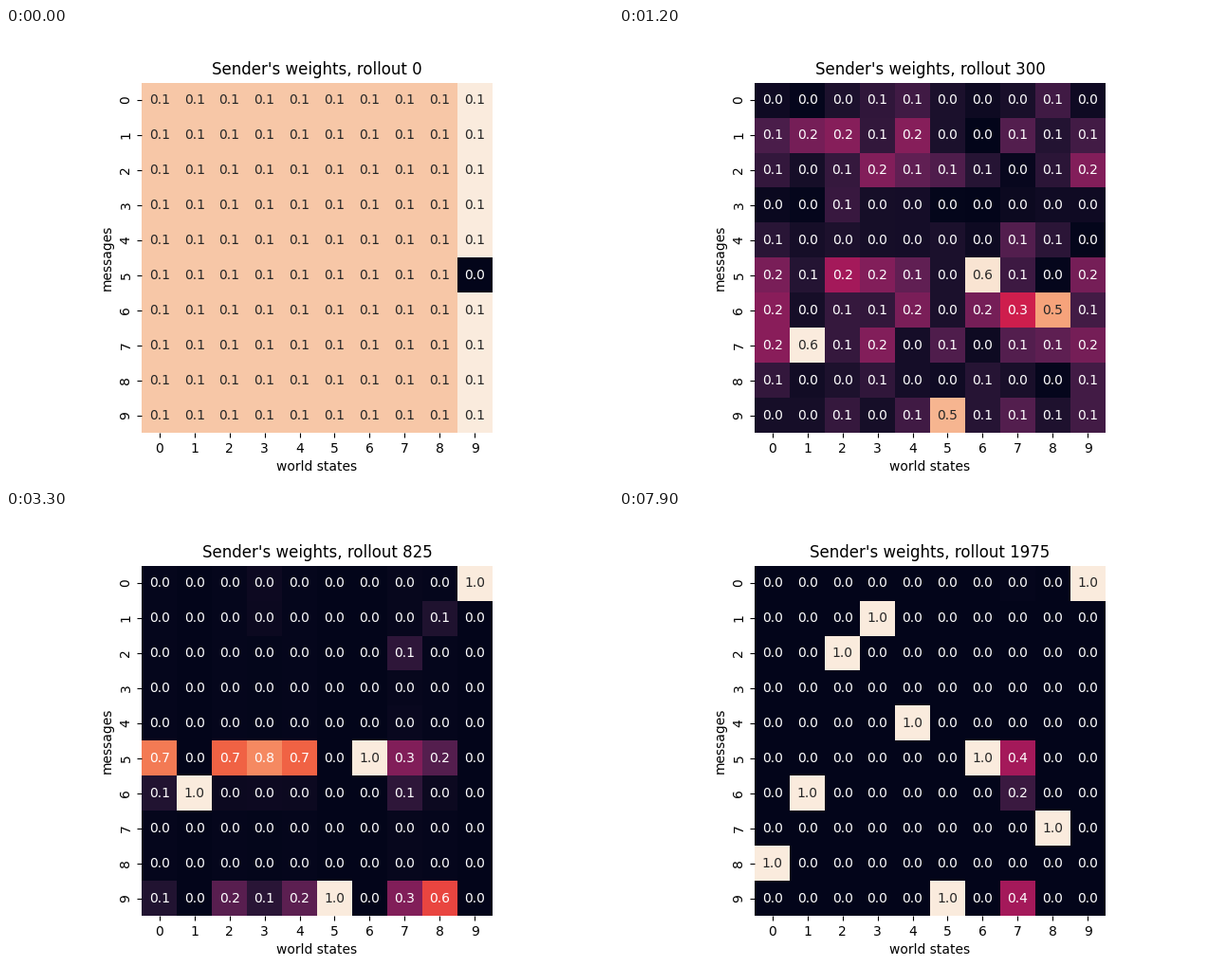
These frames come from a looping animation (640x480 px, 8 s). A matplotlib script:

```python
import matplotlib.pyplot as plt
import numpy as np
from matplotlib.animation import FuncAnimation
from matplotlib.colors import LinearSegmentedColormap

N = 10
FRAMES, INTERVAL, STEP = 80, 100, 25

ROCKET = LinearSegmentedColormap.from_list("rocket", [
    (0, "#03051a"), (.1, "#221331"), (.2, "#4c1d4b"), (.25, "#611f53"),
    (.333, "#841e5a"), (.4, "#a11a5b"), (.4286, "#ad1759"), (.5, "#cb1b4f"),
    (.5714, "#e13342"), (.6, "#e83f3f"), (.667, "#f06043"), (.714, "#f37651"),
    (.75, "#f58860"), (.8, "#f69c73"), (.857, "#f6b48f"), (.9, "#f7c6a6"),
    (1, "#faebdd")])

# Per column: {weight: rows}; the rows left out share what remains of 1.
START = {c: {} for c in range(9)} | {9: {0: "5"}}
SPREAD = {
    0: {.28: "67", .11: "14", 0: "3"},
    1: {.32: "1", .34: "7", .1: "5", 0: "03"},
    2: {.34: "1", .13: "3", .12: "57"},
    3: {.14: "02578"},
    4: {.365: "1", .12: "069"},
    5: {.235: "27", .088: "01456", 0: "3"},
    6: {.345: "6", .13: "2589", 0: "13"},
    7: {.32: "6", .12: "1479", .01: "23"},
    8: {.7: "6", .1: "0", 0: "589"},
    9: {.28: "2", .04: "03", 0: "4"},
}
NARROW = {
    0: {.31: "5", .12: "12678", .005: "0"},
    1: {.815: "7", .01: "038"},
    2: {.35: "5", .12: "269"},
    3: {.24: "257", .1: "16"},
    4: {.24: "256", .08: "09"},
    5: {.945: "9"},
    6: {1: "5"},
    7: {.27: "6", .13: "14579", .01: "2"},
    8: {.24: "67", .1: "0249", .08: "1"},
    9: {.24: "57", .1: "12689"},
}
FOCUS = {
    0: {.72: "5", .1: "69"},
    2: {.67: "5", .23: "9", .03: "6"},
    3: {.75: "5", .12: "9", .035: "06", .03: "1"},
    4: {.67: "5", .24: "9", .03: "6"},
    5: {1: "9"},
    7: {.325: "59", .13: "26", .02: "4"},
    8: {.61: "9", .22: "5", .09: "1", .03: "6"},
}
SETTLED = {
    0: {.78: "5", .11: "9", .09: "6"},
    2: {.7: "5", .27: "9", .02: "6"},
    3: {.815: "5", .12: "9", .03: "06"},
    4: {.72: "5", .26: "9", .015: "6"},
    7: {.41: "59", .16: "6", .01: "0"},
    8: {.7: "9", .27: "5", .02: "6"},
}
STAGES = [(0, START), (175, SPREAD), (425, NARROW), (825, FOCUS), (1125, SETTLED)]

# Column, new message, first and last rollout of the switch
SWITCHES = [(1, 6, 450, 600), (9, 0, 625, 750), (2, 2, 1375, 1450),
            (3, 1, 1425, 1500), (4, 4, 1500, 1615), (8, 7, 1600, 1700),
            (0, 8, 1700, 1800)]


def column(spec):
    w = np.full(N, np.nan)
    for value, rows in spec.items():
        w[[int(r) for r in rows]] = value
    free = np.isnan(w)
    if free.any():
        w[free] = max(0, 1 - np.nansum(w)) / free.sum()
    return w


def make_track(c):
    keys = [(t, column(stage[c])) for t, stage in STAGES if c in stage]
    times, weights = zip(*keys)
    return times, np.array(weights)


TRACKS = [make_track(c) for c in range(N)]


def weights_at(rollout):
    w = np.empty((N, N))
    for c, (times, keys) in enumerate(TRACKS):
        w[:, c] = [np.interp(rollout, times, keys[:, r]) for r in range(N)]
    for c, row, t0, t1 in SWITCHES:
        x = np.clip((rollout - t0) / (t1 - t0), 0, 1)
        s = x * x * (3 - 2 * x)
        w[:, c] *= 1 - s
        w[row, c] += s
    return w


def luminance(rgba):
    rgb = rgba[..., :3]
    lin = np.where(rgb <= .03928, rgb / 12.92, ((rgb + .055) / 1.055) ** 2.4)
    return lin @ [.2126, .7152, .0722]


fig, ax = plt.subplots(figsize=(6.4, 4.8), dpi=100)
mesh = ax.pcolormesh(weights_at(0), cmap=ROCKET)
ax.set_aspect("equal")
ax.set(xlim=(0, N), ylim=(N, 0), xlabel="world states", ylabel="messages")
ax.spines[:].set_visible(False)
ticks = np.arange(N) + .5
ax.set_xticks(ticks, range(N))
ax.set_yticks(ticks, range(N), rotation=90, va="center")
title = ax.set_title("")
labels = [ax.text(c + .5, r + .5, "", ha="center", va="center")
          for r in range(N) for c in range(N)]


def update(i):
    rollout = i * STEP
    w = weights_at(rollout)
    mesh.set_array(w)
    mesh.set_clim(w.min(), w.max())
    light = luminance(ROCKET(mesh.norm(w).filled())).ravel()
    for label, value, lum in zip(labels, w.ravel(), light):
        label.set_text(f"{value:.1f}")
        label.set_color(".15" if lum > .408 else "w")
    title.set_text(f"Sender's weights, rollout {rollout}")
    return [mesh, title, *labels]


anim = FuncAnimation(fig, update, frames=FRAMES, interval=INTERVAL,
                     repeat=True, repeat_delay=0, blit=False)
plt.show()
```
